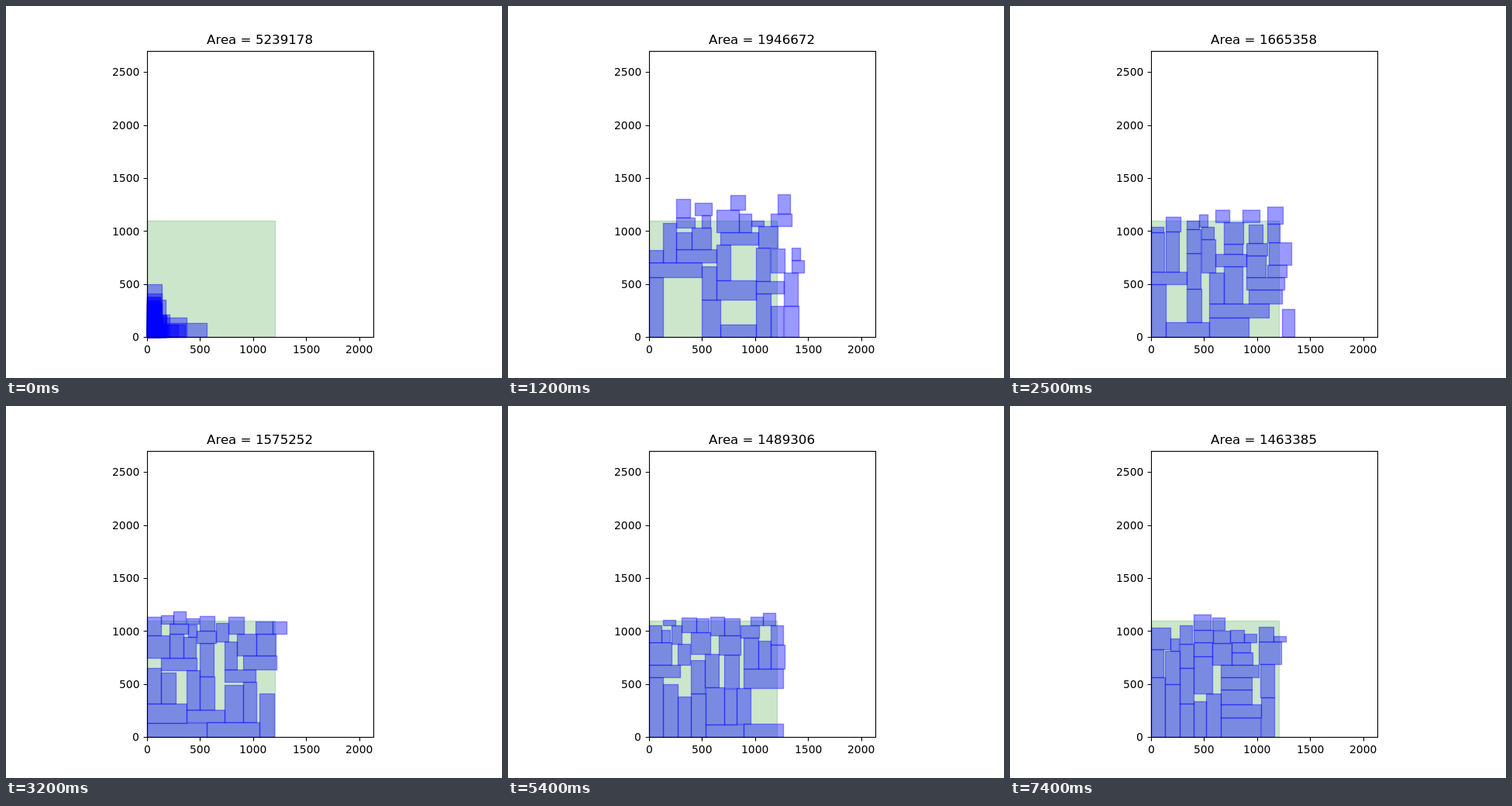
Recreate the animation shown at these times as an HTML page with a canvas. Size 640 by 480 pixels, loop 8 s.

```html
<!DOCTYPE html>
<html lang="en">
<head>
<meta charset="utf-8">
<title>Rectangle packing</title>
<style>
html, body { margin: 0; width: 100%; height: 100%; overflow: hidden; background: #fff; }
canvas { display: block; }
</style>
</head>
<body>
<canvas id="stage" width="640" height="480"></canvas>
<script>
const ctx = document.getElementById('stage').getContext('2d');
const LOOP = 8000, LEFT = 182, RIGHT = 474, TOP = 58, FLOOR = 427;
const SCALE = 0.1368, ASPECT = 1.1, TRIES = 300;

// Width and height of every block, in pixels.
const sizes = [
  [18, 24], [24, 16], [29, 29], [11, 16], [17, 51], [19, 56], [27, 16], [16, 11], [18, 16],
  [49, 16], [16, 16], [19, 43], [18, 43], [18, 46], [17, 52], [51, 25], [24, 13], [20, 22],
  [16, 36], [19, 40], [19, 19], [16, 46], [25, 28], [77, 18], [18, 43], [19, 68], [24, 48],
  [18, 31], [25, 28], [40, 16], [22, 16], [25, 16], [16, 7]
];

// Time and area of the best packing known by then.
const progress = [
  [0, 5239178], [600, 2650557], [1200, 1946672], [1800, 1760619],
  [3200, 1575252], [5400, 1489306], [7400, 1463385]
];

const every100 = (from, to) => Array.from({ length: (to - from) / 100 + 1 }, (_, i) => from + i * 100);
const improvements = [
  ...every100(100, 800), ...every100(1000, 1400), 1800, 2000, 2100, 2400, 2500, 2800, 2900,
  3200, 3600, 3800, 4500, 5400, 5600, 5700, 6600, 7400
];

function areaAt(t) {
  const i = progress.findIndex(([time]) => time >= t);
  const [t1, a1] = progress[i];
  if (t === t1) return a1;
  const [t0, a0] = progress[i - 1];
  return Math.round(a0 * (a1 / a0) ** ((t - t0) / (t1 - t0)));
}

function seeded(seed) {
  return () => {
    seed = (seed * 1664525 + 1013904223) >>> 0;
    return seed / 4294967296;
  };
}

function restingHeight(placed, x, w) {
  let top = 0;
  for (const b of placed) {
    if (b.x < x + w && b.x + b.w > x) top = Math.max(top, b.y + b.h);
  }
  return top;
}

// Drop the blocks, large ones first, where they end lowest; slack disturbs order and place.
function pack(width, slack, random) {
  const jitter = 400 * slack ** 4;
  const queue = sizes
    .map(([w, h]) => ({ size: random() < 0.75 ? [w, h] : [h, w], rank: Math.max(w, h) * (1 + slack * random()) }))
    .sort((a, b) => b.rank - a.rank);
  const placed = [];
  for (const { size: [w, h] } of queue) {
    let spot = null, lowest = Infinity;
    for (const x of [0, ...placed.map(b => b.x + b.w)]) {
      if (x + w > width) continue;
      const y = restingHeight(placed, x, w);
      const cost = y + h + jitter * random();
      if (cost < lowest) {
        lowest = cost;
        spot = { x, y, w, h };
      }
    }
    placed.push(spot);
  }
  return placed;
}

function findPacking(area, random) {
  const width = Math.min(RIGHT - LEFT - 1, Math.round(Math.sqrt(area * ASPECT) * SCALE));
  const height = area * SCALE ** 2 / width;
  let found, bestError = Infinity;
  for (let i = 0; i < TRIES && bestError > 2; i++) {
    const blocks = pack(width, random(), random);
    const error = Math.abs(Math.max(...blocks.map(b => b.x + b.w)) - width) +
      Math.abs(Math.max(...blocks.map(b => b.y + b.h)) - height);
    if (error < bestError) [found, bestError] = [blocks, error];
  }
  return found;
}

const pile = sizes.map(([w, h]) => ({ x: 0, y: 0, w, h }));
const steps = [{ at: 0, area: areaAt(0), blocks: pile }];
for (const at of improvements) {
  const area = areaAt(at);
  steps.push({ at, area, blocks: findPacking(area, seeded(at)) });
}

// Box measured from the origin of the axes.
function box({ x, y, w, h }, color) {
  const left = LEFT + x + 0.5, top = FLOOR - y - h + 0.5;
  ctx.fillStyle = ctx.strokeStyle = color;
  ctx.lineWidth = 1.39;
  ctx.fillRect(left, top, w, h);
  ctx.strokeRect(left, top, w, h);
}

// Align 0.5 centres the text on x, 1 ends it there.
function label(text, x, baseline, size, align) {
  ctx.font = size + 'px "DejaVu Sans", sans-serif';
  ctx.fillText(text, Math.round(x - ctx.measureText(text).width * align), Math.round(baseline));
}

function drawAxes() {
  ctx.strokeStyle = ctx.fillStyle = '#000';
  ctx.lineWidth = 1.11;
  ctx.strokeRect(LEFT + 0.5, TOP + 0.5, RIGHT - LEFT, FLOOR - TOP);
  ctx.beginPath();
  for (let v = 0; v <= 2500; v += 500) {
    const y = FLOOR + 0.2 - v * SCALE, tickY = Math.round(y) + 0.5;
    ctx.moveTo(LEFT + 0.5, tickY);
    ctx.lineTo(LEFT - 4.4, tickY);
    label(v, 172.3, y + 5.1, 13.89, 1);
    if (v > 2000) continue;
    const x = LEFT + v * SCALE, tickX = Math.round(x) + 0.5;
    ctx.moveTo(tickX, FLOOR + 0.5);
    ctx.lineTo(tickX, FLOOR + 5.4);
    label(v, x, 448, 13.89, 0.5);
  }
  ctx.stroke();
}

function draw({ area, blocks }) {
  ctx.fillStyle = '#fff';
  ctx.fillRect(0, 0, 640, 480);
  box({ x: 0, y: 0, w: 165, h: 150 }, 'rgba(0,128,0,0.2)');
  for (const block of blocks) box(block, 'rgba(0,0,255,0.4)');
  drawAxes();
  label('Area = ' + area, 328, 49, 16.67, 0.5);
}

const start = performance.now();
let shown = null;
function tick() {
  const t = (performance.now() - start) % LOOP;
  const step = steps.filter(s => s.at <= t).pop();
  if (step !== shown) draw(shown = step);
  requestAnimationFrame(tick);
}
tick();
</script>
</body>
</html>
```
